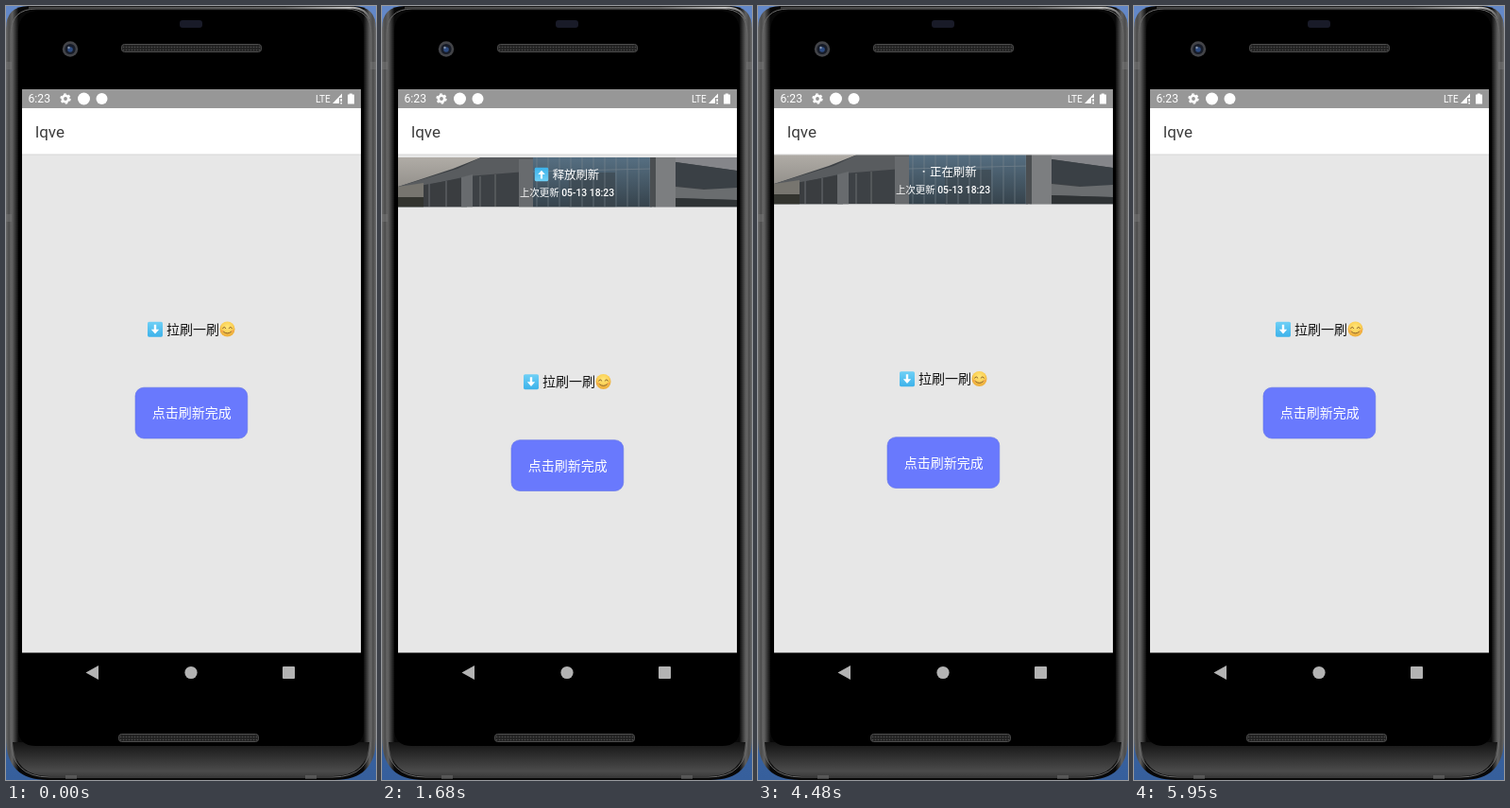
An HTML page for the animation above (6020 ms loop, 392x818 px).

```html
<!DOCTYPE html>
<html lang="zh">
<head>
<meta charset="utf-8">
<style>
html, body { margin: 0; width: 100%; height: 100%; overflow: hidden; background: #3b6199; }
svg { display: block; width: 392px; height: 818px; }
text { font-family: Roboto, "Noto Sans CJK SC", "Noto Sans CJK", sans-serif; }
</style>
</head>
<body>
<svg viewBox="0 0 392 818">
  <defs>
    <linearGradient id="desk" x2="0" y2="1">
      <stop offset="0" stop-color="#6388c8"/><stop offset="1" stop-color="#365f9c"/>
    </linearGradient>
    <linearGradient id="rim">
      <stop offset="0" stop-color="#6a6a6a"/><stop offset=".008" stop-color="#4c4c4c"/>
      <stop offset=".017" stop-color="#606060"/><stop offset=".023" stop-color="#404040"/>
      <stop offset=".034" stop-color="#080808"/><stop offset=".966" stop-color="#080808"/>
      <stop offset=".977" stop-color="#404040"/><stop offset=".983" stop-color="#606060"/>
      <stop offset=".992" stop-color="#4c4c4c"/><stop offset="1" stop-color="#6a6a6a"/>
    </linearGradient>
    <linearGradient id="chin" x2="0" y2="1">
      <stop offset="0" stop-color="#141414"/><stop offset=".85" stop-color="#4b4b4b"/><stop offset="1" stop-color="#3c3c3c"/>
    </linearGradient>
    <linearGradient id="shine">
      <stop offset="0" stop-color="#444"/><stop offset=".75" stop-color="#6a6a6a"/>
      <stop offset=".94" stop-color="#ccc"/><stop offset="1" stop-color="#666"/>
    </linearGradient>
    <linearGradient id="sky" x2="0" y2="1">
      <stop offset="0" stop-color="#b0aca6"/><stop offset="1" stop-color="#94918c"/>
    </linearGradient>
    <linearGradient id="glass" x2="0" y2="1">
      <stop offset="0" stop-color="#566f82"/><stop offset="1" stop-color="#36434c"/>
    </linearGradient>
    <linearGradient id="blue" x2="0" y2="1">
      <stop offset="0" stop-color="#6fd0f6"/><stop offset="1" stop-color="#3db2ea"/>
    </linearGradient>
    <radialGradient id="skin" cy=".35">
      <stop offset="0" stop-color="#ffe67a"/><stop offset=".75" stop-color="#fbd055"/><stop offset="1" stop-color="#efb340"/>
    </radialGradient>
    <pattern id="mesh" width="3" height="3" patternUnits="userSpaceOnUse">
      <rect width="3" height="3" fill="#222"/><circle cx="1.5" cy="1.5" r=".8" fill="#4a4a4a"/>
    </pattern>
    <clipPath id="page"><rect x="17" y="157" width="359" height="526.5"/></clipPath>
    <clipPath id="strip"><rect x="17" width="359" height="52.5"/></clipPath>
    <g id="arrowBox">
      <rect x="-8" y="-8" width="16" height="16" rx="1.6" fill="url(#blue)"/>
      <path d="M-1.2-5h2.4v5H4.2L0 4.8-4.2 0h3z" fill="#fff"/>
    </g>
  </defs>

  <!-- handset -->
  <rect width="392" height="818" fill="url(#desk)"/>
  <path d="M0 24Q0 0 24 0H368Q392 0 392 24V774Q392 818 348 818H44Q0 818 0 774Z" fill="url(#rim)"/>
  <path d="M7 778H385Q383 814 346 814H46Q9 814 7 778Z" fill="url(#chin)"/>
  <path d="M13 28Q13 5 36 5H356Q379 5 379 28V764Q379 782 360 782H32Q13 782 13 764Z"/>
  <path d="M5 774V30Q5 3 32 3H360Q387 3 387 30V774Q387 815 346 815H46Q5 815 5 774Z" fill="none" stroke="#6a6a6a"/>
  <path d="M24 1.8H368Q382 3 385 14" fill="none" stroke="url(#shine)" stroke-width="2"/>
  <path d="M0 59h6v8H0zM386 59h6v8h-6zM0 220h6v8H0zM63 813h12v4H63zM317 813h12v4h-12z" fill="#777" opacity=".5"/>
  <rect x="184" y="15" width="24" height="8" rx="3" fill="#191b28"/>
  <circle cx="68" cy="45.5" r="8.2" fill="#434448"/>
  <circle cx="68" cy="45.5" r="5.6" fill="#171c28"/>
  <circle cx="68" cy="46" r="2.8" fill="#2c4a80"/>
  <circle cx="66.5" cy="44" r="1.2" fill="#8796ad"/>
  <g fill="url(#mesh)" stroke="#4d4d4d">
    <rect x="122.5" y="40.5" width="148" height="8" rx="3"/>
    <rect x="119.5" y="769.5" width="148" height="8" rx="3"/>
  </g>

  <!-- page -->
  <rect x="17" y="157" width="359" height="526.5" fill="#e7e7e7"/>
  <g clip-path="url(#page)">
    <g id="header">
      <g clip-path="url(#strip)">
        <rect x="17" width="359" height="52.5" fill="#3d4145"/>
        <path d="M17 0H105L75 12 17 31z" fill="url(#sky)"/>
        <path d="M17 31L80 12 105 0H165V14L90 20 17 36z" fill="#595c5f"/>
        <path d="M17 34L90 21V52.5H17z" fill="#3a3d40"/>
        <path d="M17 31L44 27V44H17z" fill="#77756f"/>
        <path d="M17 42H44V52.5H17z" fill="#33342f"/>
        <path d="M50 28V52M68 25V52M104 20V52M120 18V52" stroke="#606366" stroke-width="1.3"/>
        <path d="M84 21L96 18V52.5H84zM145 2H160V52.5H145z" fill="#686b6e"/>
        <path d="M160 0H286V52.5H160z" fill="url(#glass)"/>
        <path d="M198 16H247V52.5H198z" fill="#3b454c" opacity=".6"/>
        <g id="bars" stroke="#7f8b93" stroke-width=".8" opacity=".7"/>
        <path d="M288 0H311V52.5H288z" fill="#7c7e80"/>
        <path d="M284 0H290V52.5H284z" fill="#4a4e51"/>
        <path d="M311 0H376V14L311 5z" fill="#85868a"/>
        <path d="M311 5L376 14V36L311 30z" fill="#3a4045"/>
        <path d="M311 31L341 34 376 32V45L311 43z" fill="#6a6d6f"/>
        <path d="M311 43L376 45V52.5H311z" fill="#2f3335"/>
      </g>
      <g fill="#fff">
        <use id="arrow" href="#arrowBox"/>
        <path id="spinner" fill="none" stroke="#fff" stroke-width="1.8"/>
        <text id="label" y="22.6" font-size="12.4" font-weight="500"></text>
        <text x="146" y="40.6" font-size="10.4" font-weight="500">上次更新 05-13 18:23</text>
      </g>
    </g>
    <g id="content">
      <use href="#arrowBox" x="158" y="341.7"/>
      <text x="170" y="346.6" font-size="14" font-weight="300" fill="#111">拉刷一刷</text>
      <g transform="translate(234.5 341.5)" fill="none" stroke="#7d5526" stroke-linecap="round">
        <circle r="8" fill="url(#skin)" stroke="none"/>
        <path d="M-5-1q1.7-2.6 3.4 0M1.6-1q1.7-2.6 3.4 0M-4 2.8q4 3.4 8 0" stroke-width=".9"/>
        <path d="M-6 2h1M5 2h1" stroke="#f6a04f" stroke-width="1.6"/>
      </g>
      <rect x="137" y="403.2" width="118.8" height="53.8" rx="9" fill="#6979fd" stroke="#6272e6" stroke-width=".6"/>
      <text x="154.7" y="435.4" font-size="14" fill="#fff">点击刷新完成</text>
    </g>
  </g>

  <!-- bars -->
  <rect x="17" y="88" width="359" height="20" fill="#979797"/>
  <rect x="17" y="108" width="359" height="49" fill="#fff"/>
  <path d="M17 157H376" stroke="#d6d6d6"/>
  <text x="31" y="139.3" font-size="17" fill="#3c3c3c">lqve</text>
  <g fill="#fff">
    <text x="23.5" y="102.4" font-size="12.2">6:23</text>
    <text x="328" y="101.6" font-size="10">LTE</text>
    <circle cx="63" cy="98" r="3.2" fill="none" stroke="#fff" stroke-width="2.6"/>
    <circle cx="63" cy="98" r="4.8" fill="none" stroke="#fff" stroke-width="1.8" stroke-dasharray="2.5 2.527"/>
    <circle cx="82.5" cy="98" r="6.5"/>
    <circle cx="101.5" cy="98" r="6"/>
    <path d="M346 103L356 92.5V97H353V103zM354.3 98h1.7v3h-1.7zM354.3 102h1.7v1.4h-1.7z"/>
    <path d="M363.8 92.5h3v1h1.7q.5 0 .5.5v9q0 .5-.5.5h-6q-.5 0-.5-.5v-9q0-.5.5-.5h1.3z"/>
  </g>
  <g fill="#b3b3b3">
    <path d="M84.5 704.5L98 697V712z"/>
    <circle cx="196" cy="704.5" r="6.6"/>
    <rect x="293" y="698" width="13" height="13" rx="1"/>
  </g>
</svg>

<script>
const LOOP = 6020, STEP = 70, HEADER = 52.5;
const RELEASE = 1820, DONE = 4760;
const $ = id => document.getElementById(id);
const clamp = v => Math.min(1, Math.max(0, v));
const smooth = v => v * v * (3 - 2 * v);

// [time, pull distance]
const pulls = [[0, 0], [420, 0], [1050, 44], [1680, 55.5], [1820, 55.5], [1960, HEADER],
  [5180, HEADER], [5530, 0], [LOOP, 0]];

function pullAt(t) {
  const i = pulls.findIndex(p => p[0] > t);
  const [t0, a] = pulls[i - 1], [t1, b] = pulls[i];
  const u = (t - t0) / (t1 - t0);
  return a + (b - a) * (t >= RELEASE ? smooth(u) : u);
}

// cubic-bezier(.4, 0, .2, 1)
function fastOutSlowIn(x) {
  let lo = 0, hi = 1, s = .5;
  for (let i = 0; i < 18; i++) {
    s = (lo + hi) / 2;
    const bx = 1.2 * s * (1 - s) ** 2 + .6 * s * s * (1 - s) + s ** 3;
    if (bx < x) lo = s; else hi = s;
  }
  return smooth(s);
}

function spinnerPath(t) {
  const since = t - 2240, turns = since / 1333 + .28;
  const cycle = Math.floor(turns), phase = turns - cycle;
  const tail = 270 * (cycle + fastOutSlowIn(clamp(phase * 2 - 1)));
  const head = 270 * (cycle + fastOutSlowIn(clamp(phase * 2))) + 12;
  const spin = 20 + since * (720 / 4444 + 90 / 1333);
  const point = deg => {
    const a = (deg + spin) * Math.PI / 180;
    return `${169 + 6.6 * Math.cos(a)} ${18 + 6.6 * Math.sin(a)}`;
  };
  return `M${point(tail)}A6.6 6.6 0 ${head - tail > 180 ? 1 : 0} 1 ${point(head)}`;
}

function headerState(t, pull) {
  if (t >= DONE) return ["刷新完成", 173];
  if (t >= RELEASE) return ["正在刷新", 182];
  return [pull >= HEADER ? "释放刷新" : "下拉刷新", 180.7];
}

function render(t) {
  const pull = pullAt(t), [text, x] = headerState(t, pull);
  $("header").setAttribute("transform", `translate(0 ${157 + pull - HEADER})`);
  $("content").setAttribute("transform", `translate(0 ${pull})`);
  $("label").textContent = text;
  $("label").setAttribute("x", x);
  const flip = pull >= HEADER ? -1 : 1;
  $("arrow").setAttribute("transform", `translate(169 18) scale(.9 ${.9 * flip})`);
  $("arrow").style.display = t < RELEASE ? "" : "none";
  const busy = t >= RELEASE && t < DONE;
  $("spinner").style.display = busy ? "" : "none";
  if (busy) $("spinner").setAttribute("d", spinnerPath(t));
}

$("bars").innerHTML = Array.from({ length: 11 }, (_, i) =>
  `<path d="M${164 + i * 12} 0V52.5"/>`).join("") + '<path d="M160 15L286 12"/>';

const start = performance.now();
function tick() {
  const t = (performance.now() - start) % LOOP;
  render(Math.floor(t / STEP) * STEP);
  requestAnimationFrame(tick);
}
tick();
</script>
</body>
</html>
```
